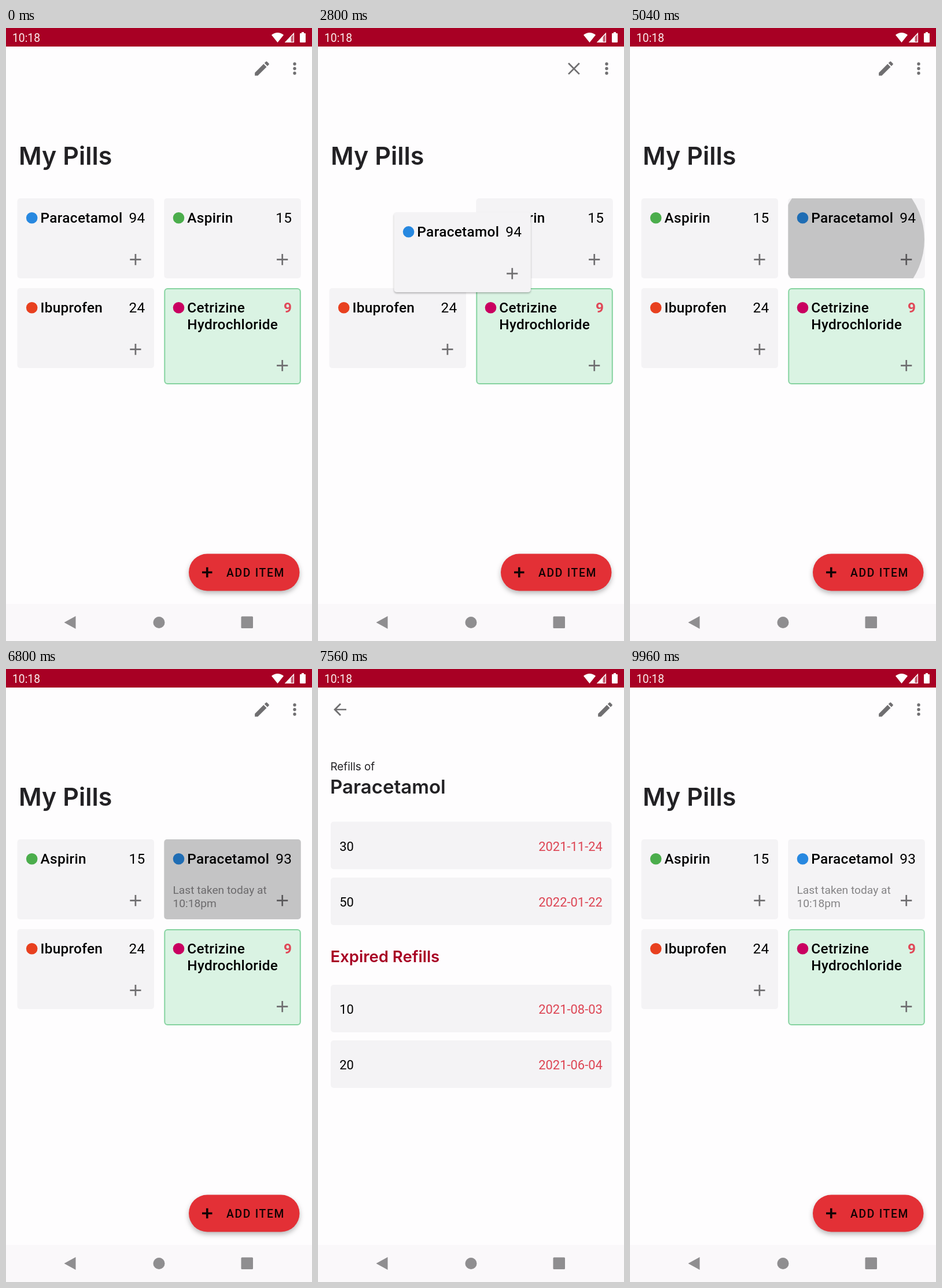
An HTML page for the animation above (10 s loop, 529 px wide and 1058 px high).

```html
<!DOCTYPE html>
<html lang="en">
<head>
<meta charset="utf-8">
<title>My Pills</title>
<style>
  html, body { margin: 0; width: 100%; height: 100%; overflow: hidden; background: #fefdfe; }
  svg { display: block; width: 100vw; height: 100vh; font-family: Roboto, sans-serif; }
  .name { font-size: 24.4px; font-weight: 500; letter-spacing: .3px; }
  .count { font-size: 24.4px; letter-spacing: .3px; text-anchor: end; }
  .low { font-weight: 700; fill: #e04858; }
  .note { font-size: 19.2px; fill: #858486; }
  .head { font-family: Inter, sans-serif; font-weight: 600; fill: #222124; }
  .cell { font-size: 21.9px; }
  .date { fill: #dd4453; text-anchor: end; }
  .icon { fill: #706f71; }
  .line { fill: none; stroke: #706f71; stroke-width: 2.7; }
</style>
</head>
<body>
<svg viewBox="0 0 529 1058" preserveAspectRatio="none">
  <defs>
    <path id="pencil" transform="scale(1.37) translate(-12 -12)" d="M3 17.25V21h3.75L17.81 9.94l-3.75-3.75L3 17.25zM20.71 7.04c.39-.39.39-1.02 0-1.41l-2.34-2.34c-.39-.39-1.02-.39-1.41 0l-1.83 1.83 3.75 3.75 1.83-1.83z"/>
    <path id="plus" d="M-9.6 0H9.6M0-9.6V9.6"/>
    <g id="window">
      <rect width="529" height="1058" fill="#fefdfe"/>
      <rect width="529" height="32" fill="#a80024"/>
      <rect y="994" width="529" height="64" fill="#faf8fa"/>
    </g>
    <clipPath id="cardShape"><rect width="236.5" height="138" rx="5"/></clipPath>
  </defs>

  <g id="main">
    <use href="#window"/>
    <use id="edit" class="icon" href="#pencil" x="442.5" y="70"/>
    <path id="close" class="line" d="M433 60.800l18.800 18.800M451.800 60.800l-18.800 18.800"/>
    <circle id="tap" r="19"/>
    <g class="icon"><circle cx="499" cy="62" r="2.700"/><circle cx="499" cy="70" r="2.700"/><circle cx="499" cy="78" r="2.700"/></g>
    <text class="head" x="22" y="236" font-size="43">My Pills</text>
    <g id="cards"></g>
    <rect x="316" y="907.500" width="191.500" height="64" rx="32" fill="#e33036" style="filter:drop-shadow(0 4px 4px rgba(0,0,0,.28))"/>
    <path d="M339 939.500h17.500M347.750 930.750v17.500" stroke="#120304" stroke-width="3.600"/>
    <text x="381" y="947" font-size="19.300" font-weight="500" letter-spacing="1.700" fill="#120304">ADD ITEM</text>
  </g>

  <g id="detail">
    <use href="#window"/>
    <path class="icon" transform="translate(38 70) scale(1.37) translate(-12 -12)" d="M20 11H7.830l5.590-5.590L12 4l-8 8 8 8 1.410-1.410L7.830 13H20v-2z"/>
    <use class="icon" href="#pencil" x="496.500" y="70"/>
    <text class="head" x="21.500" y="175" font-size="18.800" style="font-weight:400">Refills of</text>
    <text class="head" x="21" y="215" font-size="33">Paracetamol</text>
    <text class="head" x="21.500" y="506" font-size="27.500" style="fill:#a80024">Expired Refills</text>
    <g id="refills"></g>
  </g>

  <g id="system">
    <text x="11" y="23.700" font-size="19.300" fill="#fbeef0">10:18</text>
    <g fill="#fff">
      <path d="M469.500 25L459 12Q469.500 4 480 12z"/>
      <path d="M482 25L498 8V25z" opacity=".35"/>
      <path d="M482 25L492.500 13.800V25z"/>
      <path d="M483.500 24.300L497.400 9.500V24.300z" fill="none" stroke="#fff" stroke-width="1.300"/>
      <path d="M511 7h4v2h2q1 0 1 1v14q0 1-1 1h-8q-1 0-1-1V10q0-1 1-1h2z"/>
    </g>
    <g fill="#8f8e90">
      <path d="M100.500 1026L120.500 1015V1037z"/>
      <circle cx="264.500" cy="1026" r="10"/>
      <rect x="406.500" y="1015.500" width="20.500" height="20.500" rx="1.500"/>
    </g>
  </g>
</svg>

<script>
const LOOP = 10000, LEFT = 19.5, RIGHT = 273.3, TOP = 294, ROW2 = 449;
const el = id => document.getElementById(id);
const clamp = v => Math.min(1, Math.max(0, v));
const span = (t, from, to) => clamp((t - from) / (to - from));
const mix = (a, b, f) => a + (b - a) * f;
const smooth = f => (1 - Math.cos(Math.PI * f)) / 2;

function bezier(x1, y1, x2, y2) {
  const at = (a, b, s) => 3 * a * s * (1 - s) ** 2 + 3 * b * s * s * (1 - s) + s ** 3;
  return x => {
    let lo = 0, hi = 1;
    for (let i = 0; i < 24; i++) {
      const mid = (lo + hi) / 2;
      if (at(x1, x2, mid) < x) lo = mid; else hi = mid;
    }
    return at(y1, y2, lo);
  };
}
const fastOutSlowIn = bezier(.4, 0, .2, 1);
const launch = bezier(.3, 0, .8, .15), settle = bezier(.05, .7, .1, 1);
const extraSlowIn = f => f < 1 / 6 ? .4 * launch(f * 6) : .4 + .6 * settle((f - 1 / 6) * 1.2);

function card({ id, x, y, color, lines, count, height = 138, low, extra = '' }) {
  const box = low ? 'fill="#daf3e3" stroke="#86d3a0" stroke-width="2"' : 'fill="#f4f3f5"';
  const inset = low ? 1 : 0;
  return `<g id="${id}" transform="translate(${x} ${y})">
    <rect class="box" x="${inset}" y="${inset}" width="${236.5 - 2 * inset}" height="${height - 2 * inset}" rx="5" ${box}/>
    <circle cx="25.2" cy="33.7" r="9.8" fill="${color}"/>
    ${lines.map((line, i) => `<text class="name" x="40" y="${42 + 28.6 * i}">${line}</text>`).join('')}
    <text class="count ${low ? 'low' : ''}" x="221" y="42">${count}</text>
    <use class="line" href="#plus" x="204.400" y="${height - 32.300}"/>
    ${extra}</g>`;
}

const takenExtra = `
  <g id="taken"><text class="count" x="221" y="42">93</text>
    <text class="note" x="15.200" y="94">Last taken today at</text>
    <text class="note" x="15.200" y="116.500">10:18pm</text></g>
  <g clip-path="url(#cardShape)"><circle id="ripple"/></g>`;

el('cards').innerHTML = [
  { id: 'ibuprofen', x: LEFT, y: ROW2, color: '#e8401f', lines: ['Ibuprofen'], count: 24 },
  { id: 'cetrizine', x: RIGHT, y: ROW2, color: '#c90060', lines: ['Cetrizine', 'Hydrochloride'], count: 9, height: 166, low: true },
  { id: 'aspirin', x: RIGHT, y: TOP, color: '#4bad4c', lines: ['Aspirin'], count: 15 },
  { id: 'paracetamol', x: LEFT, y: TOP, color: '#2788e0', lines: ['Paracetamol'], count: 94, extra: takenExtra }
].map(card).join('');

el('refills').innerHTML = [
  [263.5, 30, '2021-11-24'], [360, 50, '2022-01-22'],
  [545, 10, '2021-08-03'], [641, 20, '2021-06-04']
].map(([y, amount, date]) => `
  <rect x="22" y="${y}" width="485.500" height="82" rx="5" fill="#f4f3f5"/>
  <text class="cell" x="37.300" y="${y + 50}">${amount}</text>
  <text class="cell date" x="491.800" y="${y + 50}">${date}</text>`).join('');

const pill = el('paracetamol'), pillBox = pill.querySelector('.box'), oldCount = pill.querySelector('.count');

const presses = [
  { down: 2040, up: 2440, x: 118, y: 69 },
  { down: 4920, up: 5180, x: 74, y: 80 },
  { down: 6240, up: 6880, x: 74, y: 80 }
];
const taps = [
  { down: 1510, up: 1750, x: 438.5, y: 75 },
  { down: 4390, up: 4630, x: 440, y: 69.5 }
];

function place(node, x, y) { node.setAttribute('transform', `translate(${x} ${y})`); }

function circle(node, x, y, r, opacity) {
  node.setAttribute('cx', x);
  node.setAttribute('cy', y);
  node.setAttribute('r', r);
  node.setAttribute('opacity', opacity);
}

function drawRipples(t) {
  const press = presses.findLast(p => t >= p.down) || presses[0];
  const grow = fastOutSlowIn(span(t, press.down, press.down + 225));
  const strength = span(t, press.down, press.down + 75) * (1 - span(t, press.up, press.up + 160));
  circle(el('ripple'), mix(press.x, 118.2, grow), mix(press.y, 69, grow), mix(71, 137.5, grow), .195 * strength);

  const tap = taps.findLast(p => t >= p.down) || taps[0];
  const shown = span(t, tap.down, tap.down + 50) * (1 - span(t, tap.up, tap.up + 90));
  circle(el('tap'), tap.x, tap.y, 19, .09 * shown);
}

function drawCards(t) {
  const drag = smooth(span(t, 2480, 3200)), drop = smooth(span(t, 3510, 3760));
  const dip = 24 * Math.sin(Math.PI * span(t, 2480, 3240)) + 2 * drag;
  place(pill, LEFT + mix(269.3 * drag, RIGHT - LEFT, drop), TOP + dip * (1 - drop));
  place(el('aspirin'), mix(RIGHT, LEFT, smooth(span(t, 3120, 3370))), TOP);

  const lift = span(t, 2480, 2600) * (1 - span(t, 3900, 4000));
  pillBox.style.filter = lift ? `drop-shadow(0 2px 1.5px rgba(0,0,0,${.26 * lift}))` : 'none';

  const taken = span(t, 5310, 5560);
  oldCount.setAttribute('opacity', 1 - taken);
  el('taken').setAttribute('opacity', taken);

  const editing = t >= 1520 && t < 4400;
  el('edit').setAttribute('visibility', editing ? 'hidden' : 'visible');
  el('close').setAttribute('visibility', editing ? 'visible' : 'hidden');
}

function zoom(node, scale) {
  node.setAttribute('transform', `translate(264.5 529) scale(${scale}) translate(-264.5 -529)`);
}

function drawPages(t) {
  const OPEN = 7110, CLOSE = 8740;
  const open = extraSlowIn(span(t, OPEN, OPEN + 400)), shut = extraSlowIn(span(t, CLOSE, CLOSE + 400));
  const closing = t >= CLOSE;
  zoom(el('main'), closing ? mix(1.1, 1, shut) : mix(1, 1.15, open));
  zoom(el('detail'), closing ? mix(1, .9, shut) : mix(.85, 1, open));
  const alpha = span(t, OPEN + 50, OPEN + 133) * (1 - span(t, CLOSE + 33, CLOSE + 83));
  el('detail').setAttribute('opacity', alpha);
}

function frame() {
  const t = performance.now() % LOOP;
  drawRipples(t);
  drawCards(t);
  drawPages(t);
  requestAnimationFrame(frame);
}
frame();
</script>
</body>
</html>
```
